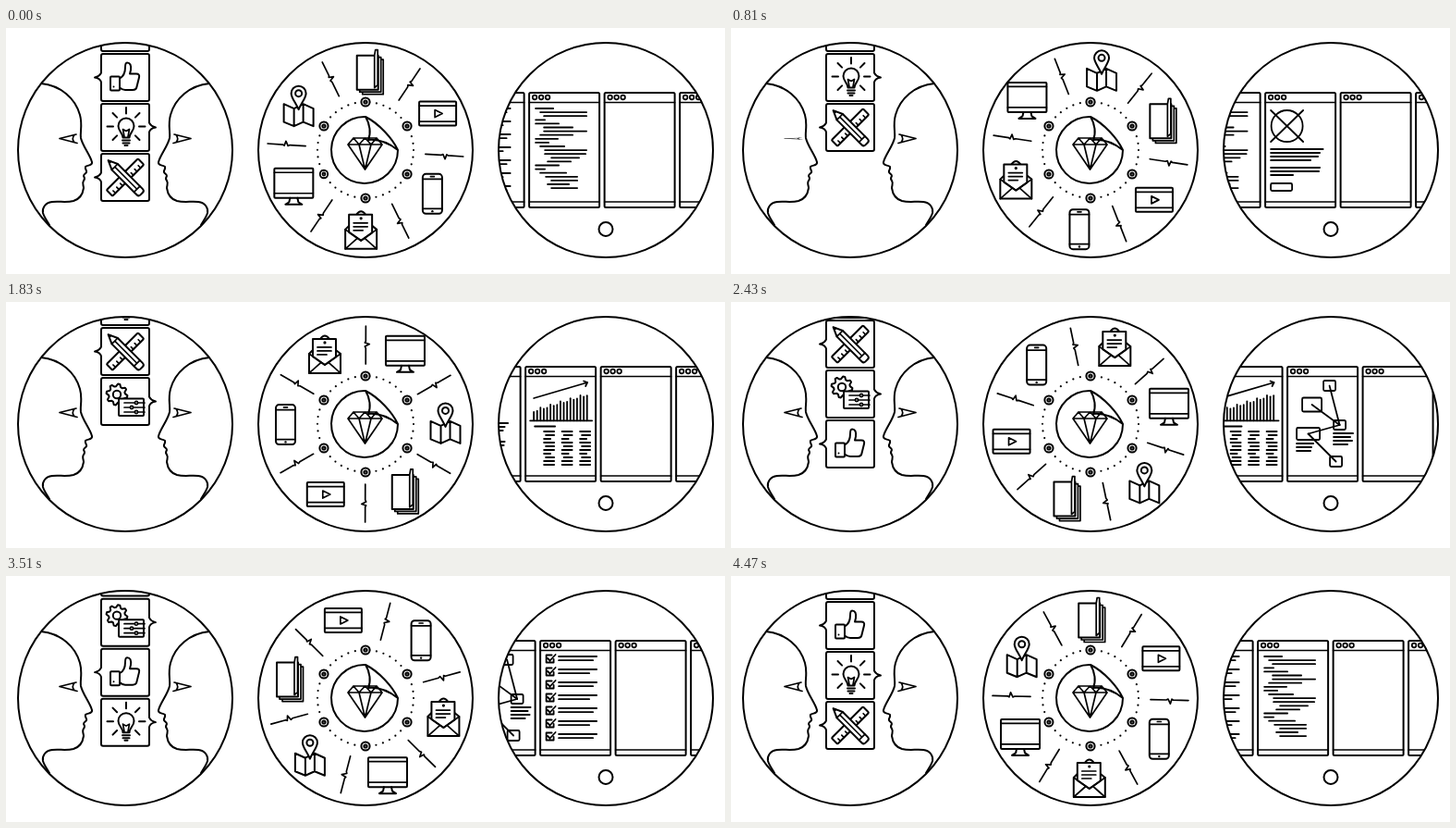
Write an HTML page that moves like this. It is 778 by 266 pixels and loops after 4.5 s.

```html
<!DOCTYPE html>
<html lang="en">
<head>
<meta charset="utf-8">
<title>Process icons</title>
<style>
html,body{margin:0;width:100%;height:100%;overflow:hidden;background:#fff}
svg{display:block;width:778px;height:266px;fill:none;stroke:#000;stroke-width:2;stroke-linecap:round;stroke-linejoin:round}
.w{fill:#fff}
.k{fill:#000;stroke:none}
.s{stroke-width:1.7}
</style>
</head>
<body>
<svg id="stage" viewBox="0 0 778 266">
  <defs>
    <clipPath id="c0"><circle cx="129" cy="132" r="116"/></clipPath>
    <clipPath id="c2"><circle cx="649" cy="132" r="116"/></clipPath>
    <path id="head" d="M38 60C59 62 75 76 80 94C83 105 80 112 81 119C83 128 91 137 93 145C94 149 88 148 86 150C85 153 88 154 87 156C86 158 84 158 84 160C85 162 86 163 84 165C82 168 84 170 84 173C83 180 80 185 73 187C65 189 57 187 50 188C42 189 39 195 40 200C41 204 44 208 47 213"/>
    <path id="eye" class="s" d="M76 115L58 119.5L77 124.5M74 115.5Q70.5 120 74 123.5"/>
  </defs>
  <g clip-path="url(#c0)">
    <use href="#head"/>
    <use href="#head" transform="matrix(-1 0 0 1 258 0)"/>
    <use href="#eye" id="leftEye"/>
    <use href="#eye" transform="matrix(-1 0 0 1 258 0)"/>
    <g id="chat"></g>
  </g>
  <g transform="translate(389 132)">
    <circle r="52" stroke-width="2.2" stroke-dasharray="0 7.779"/>
    <g id="nodes"></g>
    <g id="spokes"></g>
    <g id="orbit"></g>
    <path d="M0-36A36 36 0 1 0 35 0C29-13 14-29 0-36C5-28 6-18 3-11C14-12 26-7 35 0"/>
    <path class="s" d="M-13-13H12L18-6L-.5 21L-19-6ZM-19-6H18M-13-13L-7-6L-.5-13L6-6L12-13M-7-6L-.5 21L6-6"/>
  </g>
  <g clip-path="url(#c2)">
    <g id="panels"></g>
    <circle id="button" cx="649" r="7.5"/>
  </g>
  <circle cx="129" cy="132" r="116"/>
  <circle cx="389" cy="132" r="116"/>
  <circle cx="649" cy="132" r="116"/>
</svg>
<script>
const LOOP = 4500;
const $ = id => document.getElementById(id);
const clamp = v => Math.max(0, Math.min(1, v));
const mod = (a, n) => ((a % n) + n) % n;
const range = n => [...Array(n).keys()];
const inOut = x => x < .5 ? 4 * x ** 3 : 1 - 4 * (1 - x) ** 3;
const out = x => 1 - (1 - x) ** 2;

function group(parent, html = '') {
  const g = document.createElementNS('http://www.w3.org/2000/svg', 'g');
  g.innerHTML = html;
  parent.appendChild(g);
  return g;
}
const place = (g, x, y, s = 1) => g.setAttribute('transform', `translate(${x.toFixed(2)} ${y.toFixed(2)}) scale(${s.toFixed(3)})`);
const path = (d, cls = '') => `<path class="${cls}" d="${d}"/>`;
const dot = (x, y, r, cls = '') => `<circle class="${cls}" cx="${x}" cy="${y}" r="${r}"/>`;
const box = (x, y, w, h, r = 1, cls = '') => `<rect class="${cls}" x="${x}" y="${y}" width="${w}" height="${h}" rx="${r}"/>`;

// --- speech bubbles ---
const gear = 'M' + range(32).map(i => {
  const r = i % 4 < 2 ? 11.5 : 8.8, a = (i + .5) * Math.PI / 16;
  return `${(-9 + r * Math.cos(a)).toFixed(1)} ${(-7.5 + r * Math.sin(a)).toFixed(1)}`;
}).join('L') + 'Z';
const rays = [0, 45, 135, 180, 225, 270, 315].map(a =>
  `<path d="M14 0H20.5" transform="translate(1 -1) rotate(${a})"/>`).join('');
const talk = [
  // thumb
  box(-16, -1, 10, 15) + dot(-12.5, 10, 1, 'k') +
  path('M-6 1C-2-1 0-6 0-11Q0-16 2-16Q7-16 6-8L5-4H12Q16-4 15 0L12.500 10Q12 13.500 8 13.500H0Q-3 13.500-6 11'),
  // bulb
  rays + path('M-2.500 11C-2.500 6-7.500 4-7.500-1.500A8.500 8.500 0 0 1 9.500-1.500C9.500 4 4.500 6 4.500 11ZM-3 14H5M-2.500 17H4.500M-.5 19.500H2.500') +
  path('M-1 10L-2.500 2L1 4L4.500 2L3 10', 's'),
  // ruler and pencil
  `<g transform="rotate(45)">${box(-4.5, -24, 9, 48)}${path(range(8).map(i => `M4.500 ${-19 + i * 5.5}h-3.500`).join(''), 's')}</g>` +
  `<g transform="rotate(-45)">${path('M0-26L4.500-16V22Q4.500 25 2 25H-2Q-4.500 25-4.500 22V-16Z', 'w')}${path('M-4.500-16H4.500M0-16V18M-4.500 18H4.500M-1-23H1', 's')}</g>`,
  // gear and sliders
  path(gear) + dot(-9, -7.5, 4.2) + box(-7, -3, 27, 18.5, 1, 'w') +
  range(3).map(i => path(`M-1 ${1.5 + i * 5}H21`, 's') + dot(i == 1 ? 7 : 12, 1.5 + i * 5, 1.6, 'w s')).join('')
];
const bubble = 'M-24-25.500H24q2 0 2 2V-5q2 4 7 5q-6 1-7 5V23.500q0 2-2 2H-24q-2 0-2-2V-23.500q0-2 2-2Z';
const pops = { 3: 890, 4: 1950, 5: 2980, 6: 4230 };
const shifts = [30, 1155, 2310, 3420];
const bubbles = range(8).map(i => {
  const j = i - 1, k = mod(j, 4);
  return { j, g: group($('chat'), `<path d="${bubble}" transform="scale(${k % 2 ? 1 : -1} 1)"/>` + talk[k]) };
});

function drawChat(t) {
  const up = shifts.reduce((sum, s) => sum + inOut(clamp((t - s) / 360)), 0);
  for (const { j, g } of bubbles) {
    const size = j in pops ? out(clamp((t - pops[j]) / 200)) : 1;
    g.style.display = size ? '' : 'none';
    place(g, 129, 53.5 + 54 * (j - up), size);
  }
  const lid = 1 - .9 * Math.sin(Math.PI * clamp((t - 740) / 180));
  $('leftEye').setAttribute('transform', `translate(0 ${119.5 * (1 - lid)}) scale(1 ${lid})`);
}

// --- orbiting icons, each with its distance from the centre ---
const icons = [
  // papers
  [84.5, path('M9-16H12V21.500H-11V19M12-13.500H14.500V24H-8V21.500', 's') + box(-14, -18, 23, 37, 0, 'w') + path('M5-18L6-24H8.500V14L5 17Z', 'w s')],
  // video
  [87.5, box(-20, -13, 40, 26) + path('M-20-8.500H20M-20 8.500H20M-3-4L5 0L-3 4Z', 's')],
  // phone
  [86.5, box(-10.5, -21.5, 21, 43, 3.5) + path('M-10.500-16H10.500M-10.500 16H10.500M-2-18.800H2', 's') + dot(0, 18.8, 1.2, 'k')],
  // letter
  [87, path('M-13-5L-17-1V20H17V-1L12-5M-5-17Q0-24 5-17') + path('M-13 2V-17H12V2.500L0 11Z', 'w') +
    path('M-17-1L0 11L17-1M-17 20L-4 8.500M17 20L4 8.500M-8-8H7M-8-4H7M-8 0H2', 's') + dot(0, -13, 1.6, 'k')],
  // monitor
  [87, box(-21, -19.5, 42, 32) + path('M-21-15H21M-21 7.500H21', 's') + path('M-4 12.500L-5 17L-9 19.500H9L5 17L4 12.500')],
  // map
  [86.5, path('M-16-2.500L-5 2.500L5-2.500L16 2.500V21.500L5 17L-5 21.500L-16 17ZM-5 2.500V21.500M5-2.500V17') +
    path('M0 3.500C-3-4-8-9-8-14A8 8 0 0 1 8-14C8-9 3-4 0 3.500Z', 'w') + dot(0, -14, 3.5)]
].map(([reach, html]) => ({ reach, g: group($('orbit'), html) }));

$('spokes').innerHTML = range(6).map(i =>
  `<path class="s" transform="rotate(${i * 60 + 3.8})" d="M65 0H82L84-1L86.500 4L88-1L89.500 0H106"/>`).join('');
const nodes = range(6).map(() => group($('nodes'), dot(0, 0, 4.6, 'w') + dot(0, 0, 1.6)));
const pulses = { 2: 3870, 4: 60, 5: 3150 };

function polar(deg, r) {
  const a = deg * Math.PI / 180;
  return [r * Math.sin(a), -r * Math.cos(a)];
}
function drawOrbit(t) {
  const turn = t / LOOP * 360;
  icons.forEach(({ reach, g }, i) => place(g, ...polar(turn + i * 60 + 3.2, reach)));
  $('spokes').setAttribute('transform', `rotate(${turn})`);
  nodes.forEach((g, i) => {
    const gap = i in pulses ? Math.abs(mod(t - pulses[i] + LOOP / 2, LOOP) - LOOP / 2) : LOOP;
    place(g, ...polar(i * 60, 52), 1 - .2 * clamp(1 - gap / 100));
  });
}

// --- screens: each is a list of strokes drawn one after another ---
const line = (y, a, b) => `M${b} ${y}H${a}`;
const frame = (x, y, w, h) =>
  `M${x + w / 2 - 1.5} ${y - h / 2}h${3 - w}q-1.500 0-1.500 1.500v${h - 3}q0 1.500 1.500 1.500h${w - 3}q1.500 0 1.500-1.500v${3 - h}q0-1.500-1.500-1.500Z`;
const wire = [
  'M2.500-26a17 17 0 1 0-34 0a17 17 0 1 0 34 0', 'M3-43L-32-9M-32-43L3-9',
  ...[[-1, 24.5], [3, 21], [7, 19], [11, 11], [19, 21], [23, 20], [27, -8]].map(([y, b]) => line(y, -32, b)),
  frame(-20.5, 40, 23, 8)
];
const chart = [
  line(-3.7, -33, 34),
  ...range(17).map(i => `M${(-29 + i * 3.6).toFixed(1)}-3.700v${(-9.5 - i * 1.1 - (i % 3 == 2 ? 2.5 : 0)).toFixed(1)}`),
  'M-29-28L29-45M25-46.500L29-45L27-41', line(2.5, -28, -6),
  ...range(30).map(i => {
    const r = i % 10, x = -18 + 19.5 * Math.floor(i / 10);
    return line(8 + r * 4, x + (r % 3 == 1 ? 2 : 0), x + 11 - (r % 4 == 2 ? 4 : 0));
  })
];
const flow = [
  'M7.500-41.500L18.500 1', 'M-11.500-21L18.500 1', 'M18.500 1L-15.500 10.500', 'M-15.500 10.500L14.500 40.500',
  frame(7.5, -41.5, 13, 11), frame(-11.5, -21, 21, 15), frame(18.5, 1, 13, 10),
  frame(-15.5, 10.5, 25, 13), frame(14.5, 40.5, 13, 11),
  line(21, -28, -10), line(25, -28, -12), line(29, -28, -13),
  line(10, 12, 33), line(14, 12, 30), line(18, 12, 32), line(22, 12, 27)
];
const rows = range(7).map(i => -43 + i * 14);
const check = [
  rows.map(y => `M-23.500 ${y + 1}v3.500h-8v-8h6M-30 ${y}l2.500 2.500l6-6.500`).join(''),
  ...rows.flatMap((y, i) => [line(y - 2, -18, 23), line(y + 2.2, -18, i % 2 ? 15 : 19)])
];
const code = [
  [-31, -12], [-26, 24], [-22, 24], [-31, -21], [-31, -6], [-22, 9], [-22, 24], [-26, 9], [-31, -7], [-31, -17], [-26, 0],
  [-21, 24], [-21, 23], [-14, 16], [-18, 7], [-31, -6], [-31, -21], [-26, 2], [-20, 14], [-14, 14], [-18, 5], [-14, 14]
].map(([a, b], i) => line((-45 + i * 4.1).toFixed(1), a, b));

const shell = box(-38, -62, 76, 124, 1.5) + path('M-38-51.500H38M-38 56H38', 's') +
  [-32, -25, -18].map(x => dot(x, -57, 2.3, 's')).join('');
const screens = [[wire, 440], [chart, 370], [flow, 340], [check, 407], [code, 400]].map(([parts, time]) => {
  const g = group($('panels'), shell);
  const ink = group(g, parts.map(d => `<path pathLength="1" d="${d}"/>`).join(''));
  ink.setAttribute('stroke-width', 1.8);
  return { g, time, strokes: [...ink.children] };
});

function drawScreens(t) {
  const STEP = 900, REST = 288;
  const n = Math.floor((t - 275) / STEP), q = t - 275 - n * STEP;
  const slide = clamp((q - REST) / (STEP - REST));
  const zoom = 1 + .05 * clamp(Math.min(q / 55, (REST - q) / 55));
  screens.forEach(({ g, time, strokes }, k) => {
    const m = mod(n - k, 5);
    place(g, 649 + 81.5 * ((m < 3 ? -m : 5 - m) - slide), 132, m ? 1 : zoom);
    const p = m < 3 ? (m * STEP + q) / time * strokes.length : 0;
    strokes.forEach((s, i) => {
      const v = clamp(p - i);
      s.style.display = v ? '' : 'none';
      s.style.strokeDasharray = v < 1 ? `${v} 2` : 'none';
    });
  });
  // the button hops as each screen settles
  const gap = mod(q - 22 + STEP / 2, STEP) - STEP / 2;
  $('button').setAttribute('cy', 217.5 - 8 * Math.cos(Math.PI / 2 * Math.min(1, Math.abs(gap) / 95)));
}

function draw(now) {
  const t = now % LOOP;
  drawChat(t);
  drawOrbit(t);
  drawScreens(t);
}
let start;
function tick(now) {
  start ??= now;
  draw(now - start);
  requestAnimationFrame(tick);
}
draw(0);
requestAnimationFrame(tick);
</script>
</body>
</html>
```
